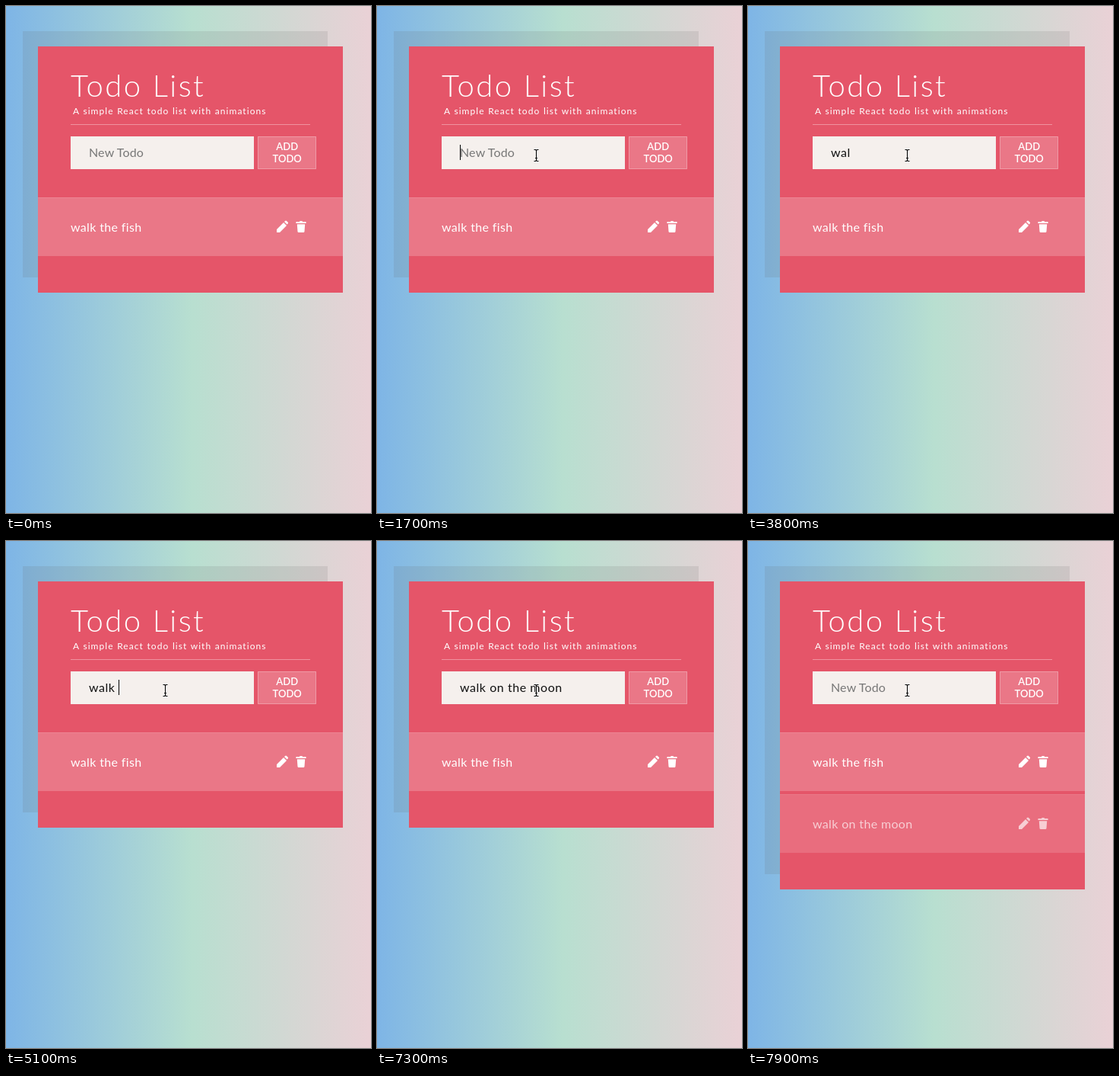
Animation of 480 by 665 pixels, one loop 8 s. Source, as an HTML page:

```html
<!DOCTYPE html>
<html lang="en">
<head>
<meta charset="utf-8">
<title>Todo List</title>
<style>
  html, body { margin: 0; width: 100%; height: 100%; overflow: hidden; }
  svg {
    display: block; width: 480px; height: 665px;
    background: linear-gradient(90deg, #7eb5e6, #b8dfd0 51%, #ead1d6);
    font: 16px Lato, sans-serif;
  }
  text { fill: #fff; white-space: pre; }
  .title { font-size: 40px; font-weight: 300; letter-spacing: 2.4px; }
  .sub { font-size: 12px; letter-spacing: 1.05px; word-spacing: .5px; }
  .btn { font-size: 13px; font-weight: 600; text-anchor: middle; }
  .item { letter-spacing: .35px; }
  .hint { fill: #777; letter-spacing: .15px; }
  .typed { fill: #111; letter-spacing: .55px; }
</style>
</head>
<body>
<svg viewBox="0 0 480 665">
  <defs>
    <g id="row">
      <path d="M42 251h401v77H42z" fill="#fff" fill-opacity=".2"/>
      <path d="M42 251h401v1H42z" fill="#fff" fill-opacity=".1"/>
      <path fill="#fff" d="M356 297v-4l9-9 4 4-9 9zM366 283l1-1q1-.8 2 0l1.6 1.6q1 1 0 2l-1 1z"/>
      <path fill="#fff" d="M382 283h3.8l.8-1h2.8l.8 1h3.8q.6 0 .6.6v1.4h-13.2v-1.4q0-.6.6-.6zM382.8 286.2h10.4l-.7 9.5q-.1 1.3-1.4 1.3h-6.2q-1.3 0-1.4-1.3z"/>
    </g>
  </defs>

  <rect id="shade" x="22" y="33" width="401" fill="#646464" fill-opacity=".14"/>
  <rect id="card" x="42" y="53" width="401" fill="#e55569"/>

  <text class="title" x="85" y="119">Todo List</text>
  <text class="sub" x="88" y="142">A simple React todo list with animations</text>
  <path d="M85 155h315v1H85z" fill="#fff" fill-opacity=".36"/>

  <path d="M85 171h241v43H85z" fill="#f5f0ed"/>
  <text class="hint" id="hint" x="109" y="198">New Todo</text>
  <text class="typed" id="typed" x="109" y="198" xml:space="preserve"></text>
  <rect id="caret" y="182" width="1" height="20" fill="#000"/>

  <rect x="331.5" y="171.5" width="76" height="42" fill="#fff" fill-opacity=".2" stroke="#fff" stroke-opacity=".34"/>
  <text class="btn" x="369.7" y="189">ADD</text>
  <text class="btn" x="369.7" y="205">TODO</text>

  <use href="#row"/>
  <text class="item" x="85" y="296">walk the fish</text>
  <g id="added" transform="translate(0 81)">
    <use href="#row"/>
    <text class="item" x="85" y="296">walk on the moon</text>
  </g>

  <g id="mouse">
    <path id="arrow" d="M0 0v14l3.2-3 2.3 5.2 2.2-1-2.3-5h4.4z" fill="#000" stroke="#fff"/>
    <g id="beam" fill="none">
      <path d="M-3-7.5h2L0-6.5l1-1h2M0-6.5v13M-1.5 3.5h3M-3 7.5h2l1-1 1 1h2" stroke="#fff" stroke-width="2.6" stroke-opacity=".85"/>
      <path d="M-3-7.5h2L0-6.5l1-1h2M0-6.5v13M-1.5 3.5h3M-3 7.5h2l1-1 1 1h2" stroke="#000" stroke-width="1.1"/>
    </g>
  </g>
</svg>
<script>
  const LOOP = 8000, STEP = 100, SUBMIT = 7700, PHRASE = 'walk on the moon';
  // [time, letters typed, caret shown]
  const typing = [
    [0, 0, 0], [1700, 0, 1], [2300, 0, 0], [2800, 1, 1], [3100, 2, 1], [3200, 3, 1],
    [3800, 3, 0], [4000, 4, 1], [4600, 4, 0], [5100, 5, 1], [5300, 6, 1], [5400, 7, 1],
    [5600, 8, 1], [5800, 10, 1], [5900, 11, 1], [6100, 12, 1], [6300, 13, 1],
    [6400, 14, 1], [6500, 15, 1], [6700, 16, 1], [7300, 16, 0], [SUBMIT, 0, 0]
  ];

  const $ = id => document.getElementById(id);
  const show = (id, on) => $(id).setAttribute('visibility', on ? 'visible' : 'hidden');
  const easeOut = (t, from, to) => {
    const p = Math.min(1, Math.max(0, (t - from) / (to - from)));
    return 1 - (1 - p) ** 2;
  };

  function drawMouse(t) {
    const e = easeOut(t, 200, 800), settle = easeOut(t, 800, 1200);
    const x = 93 + 116.5 * e, y = 39 + 170 * e - 13 * settle;
    const seen = t >= 200;
    const overText = y > 171 || (y > 82 && y < 148);
    $('mouse').setAttribute('transform', `translate(${x} ${y})`);
    show('arrow', seen && !overText);
    show('beam', seen && overText);
  }

  function drawInput(t) {
    const [, count, caret] = typing.findLast(k => k[0] <= t);
    const typed = $('typed');
    typed.textContent = PHRASE.slice(0, count);
    show('hint', !count);
    show('caret', caret);
    $('caret').setAttribute('x', 109 + (count ? Math.floor(typed.getComputedTextLength()) : 0));
  }

  function drawCard(t) {
    const height = t >= SUBMIT ? 404 : 323;
    $('card').setAttribute('height', height);
    $('shade').setAttribute('height', height);
    $('added').setAttribute('opacity', Math.max(0, (t - SUBMIT) / 280));
  }

  function draw(now) {
    const t = Math.floor(now % LOOP / STEP) * STEP;
    drawMouse(t);
    drawInput(t);
    drawCard(t);
    requestAnimationFrame(draw);
  }
  draw(0);
</script>
</body>
</html>
```
